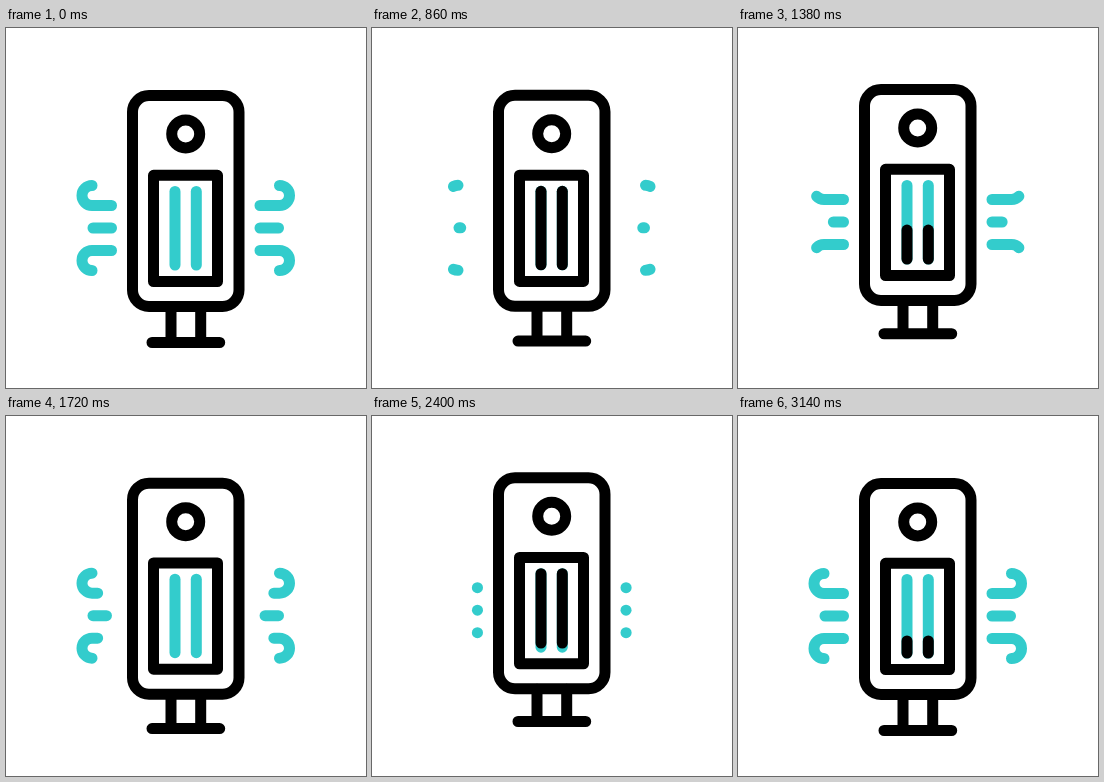
An HTML page that plays this animation: 360x360 px, repeating every 3160 ms.

```html
<!DOCTYPE html>
<html lang="en">
<head>
<meta charset="utf-8">
<title>Heater</title>
<style>
  html, body { margin: 0; width: 100%; height: 100%; overflow: hidden; background: #fff; }
  svg { display: block; width: 100vw; height: 100vh; }
  svg * { fill: none; stroke-width: 11; stroke-linecap: round; stroke-linejoin: round; }
  .ink { stroke: #000; }
  .teal { stroke: #33cccc; }
</style>
</head>
<body>
<svg viewBox="0 0 360 360">
  <defs>
    <g id="bars">
      <path pathLength="1" d="M169 163.5V237"/>
      <path pathLength="1" d="M190.3 163.5V237"/>
    </g>
    <g id="gusts">
      <path pathLength="1" d="M105.5 177.5H86A10 10 0 0 1 86 157.5"/>
      <path pathLength="1" d="M105.5 200H87"/>
      <path pathLength="1" d="M105.5 222.5H86A10 10 0 0 0 86 242.5"/>
    </g>
  </defs>
  <path id="stand" class="ink"/>
  <g id="unit">
    <g class="ink">
      <rect x="126.5" y="67.5" width="106.5" height="211" rx="16.5"/>
      <circle cx="179.7" cy="106" r="14"/>
      <rect x="147.5" y="147.3" width="64" height="106.3"/>
    </g>
    <use href="#bars" class="teal"/>
    <g id="cover" class="ink"><use href="#bars"/></g>
    <g id="wind" class="teal">
      <use href="#gusts"/>
      <use href="#gusts" transform="translate(359.5) scale(-1 1)"/>
    </g>
  </g>
</svg>
<script>
  const LOOP = 3160, STEP = 20, REST = 8;
  const byId = id => document.getElementById(id);
  const unit = byId('unit'), stand = byId('stand'), cover = byId('cover'), wind = byId('wind');

  function ease(x) {
    x = Math.min(1, Math.max(0, x));
    return x * x * (3 - 2 * x);
  }

  // Each start adds one eased unit to the phase.
  const phase = (k, starts, duration) =>
    starts.reduce((sum, s) => sum + ease((k - s) / duration), 0);

  // Rises and falls by turns; the stand follows the body a little later.
  const bob = k => phase(k, [0, 40, 82], 20) - phase(k, [17, 61, 110], 20);
  const barPhase = k => phase(k, [0, 41, 82, 123], 35);
  const windPhase = k => 1 + phase(k, [9, 44, 67, 111], 32);

  // Even phases draw a line on, odd phases wipe it off from its start.
  function trim(el, p) {
    p %= 2;
    const from = Math.max(0, p - 1), length = Math.min(1, p) - from;
    el.style.visibility = length > 0.001 ? 'visible' : 'hidden';
    el.style.strokeDasharray = length > 0.999 ? 'none' : `${length} 3`;
    el.style.strokeDashoffset = -from;
  }

  function draw(ms) {
    const k = Math.max(0, Math.floor((ms % LOOP) / STEP) - REST);
    const lift = 6 * bob(k);
    const hip = 279 - lift, foot = 314.5 - 9 * bob(k - 3);
    unit.setAttribute('transform', `translate(0 ${-lift})`);
    stand.setAttribute('d', `M165 ${hip}V${foot}M194.7 ${hip}V${foot}M146 ${foot}H213.7`);
    trim(cover, barPhase(k));
    trim(wind, windPhase(k));
  }

  const start = performance.now();
  function tick() {
    draw(performance.now() - start);
    requestAnimationFrame(tick);
  }
  tick();
</script>
</body>
</html>
```
